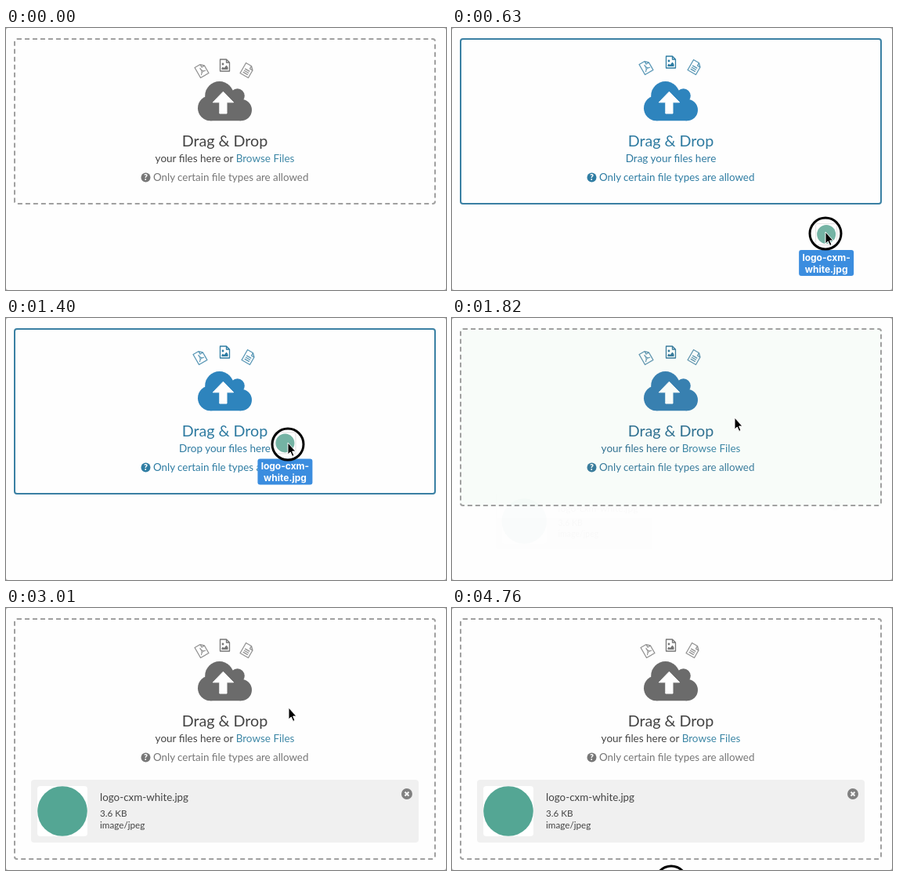
An HTML page for the animation above (4.83 s loop, 562x334 px).

```html
<!DOCTYPE html>
<html lang="en">
<head>
<meta charset="utf-8">
<title>Drag and drop upload</title>
<style>
  html, body { margin: 0; width: 100%; height: 100%; overflow: hidden; background: #b4b4b4; }
  #stage { position: relative; width: 562px; height: 334px; overflow: hidden; background: #fefefe; border-radius: 3px; }
  #panel { position: absolute; box-sizing: border-box; left: 10px; top: 13px; width: 539px;
    border: 2px dashed #a0a0a0; border-radius: 4px; background: var(--bg); }
  #panel.active { border: 2px solid #3a80a3; }
  svg { position: absolute; left: 0; top: 0; font-family: Lato, "Open Sans", sans-serif; font-size: 13.5px; }
  #icons { fill: none; stroke: var(--muted); stroke-width: 1.3; stroke-linejoin: round; }
  #icons .solid { fill: var(--muted); stroke: none; }
  #label { font: 700 12px Inter, Roboto, sans-serif; fill: #fff; text-anchor: middle; }
  .mid { text-anchor: middle; }
</style>
</head>
<body>
<div id="stage">
  <div id="panel"></div>
  <svg width="562" height="334" viewBox="0 0 562 334">
    <defs>
      <path id="sheet" d="M-6 -7.5H2L6 -3.5V7.5H-6ZM2 -7.5V-3.5H6"/>
    </defs>

    <g id="icons">
      <g id="pdf" opacity=".8">
        <use href="#sheet"/>
        <path d="M-3.5 5C-1 3 .5 -1 -.5 -3.5C-1.5 -2 1 2.5 4 2.5C1 1.5 -2 2.5 -3.5 5" stroke-width="1"/>
      </g>
      <g id="image">
        <use href="#sheet"/>
        <path class="solid" d="M-4 5.5V3.5L-2.5 2L-1 3.5L2 0L4 2.5V5.5Z"/>
        <circle class="solid" cx="-2.5" cy="-1.5" r="1.4"/>
      </g>
      <g id="doc" opacity=".8">
        <use href="#sheet"/>
        <path d="M-3.5 -.5H3.5M-3.5 2H3.5M-3.5 4.5H3.5"/>
      </g>
    </g>

    <g fill="var(--cloud)">
      <circle cx="272.6" cy="86.4" r="18.4"/>
      <circle cx="261.1" cy="102.2" r="16.1"/>
      <circle cx="295.6" cy="86.4" r="9.2"/>
      <circle cx="300.2" cy="104.5" r="13.8"/>
      <path d="M261 92H300V118.3H261Z"/>
    </g>
    <path d="M277.4 81.2L290.6 94.8H282V109H272.8V94.8H264.2Z" fill="var(--bg)" stroke="var(--bg)" stroke-linejoin="round"/>

    <text class="mid" x="279.5" y="151" font-size="19.7" fill="var(--title)">Drag &amp; Drop</text>
    <text class="mid" x="279.5" y="171" fill="var(--title)"><tspan id="hint"></tspan><tspan id="link" fill="#3d87a6">Browse Files</tspan></text>
    <circle cx="178.5" cy="190.5" r="6" fill="var(--muted)"/>
    <text class="mid" x="178.5" y="194.3" font-size="10.5" font-weight="900" fill="var(--bg)">?</text>
    <text x="188" y="195" font-size="13.35" fill="var(--muted)">Only certain file types are allowed</text>

    <g id="item">
      <rect x="32" y="219" width="495" height="80" rx="4" fill="#f0f0f0"/>
      <rect x="40" y="227" width="64" height="64" rx="4" fill="#fff"/>
      <circle cx="72" cy="259" r="31.8" fill="#54a694"/>
      <g fill="#444" font-size="11.7">
        <text x="120" y="246" font-size="13.4">logo-cxm-white.jpg</text>
        <text x="120" y="266">3.6 KB</text>
        <text x="120" y="281">image/jpeg</text>
      </g>
      <circle cx="512" cy="237" r="7" fill="#808080"/>
      <path d="M509.5 234.5L514.5 239.5M514.5 234.5L509.5 239.5" stroke="#f4f4f4" stroke-width="2"/>
    </g>

    <g id="file">
      <path d="M-13.5 -12.5H13.5V14.5H-13.5Z" fill="#fff" stroke="#ddd" opacity=".9"/>
      <circle cy="1" r="12" fill="#74b3a4"/>
      <g id="label">
        <rect x="-35" y="21" width="70" height="33" rx="3" fill="#3b8ddf"/>
        <text y="35">logo-cxm-</text>
        <text y="50">white.jpg</text>
      </g>
    </g>
    <circle id="ring" r="20" fill="none" stroke="#000" stroke-width="3"/>
    <path id="pointer" d="M0 -2V13L3.3 10L5.7 15.4L8 14.4L5.7 9H10Z" stroke="#fff" stroke-linejoin="round"/>
  </svg>
</div>
<script>
  const LOOP = 4830, STEP = 70;
  const DRAG_START = 70, OVER = 1190, DROP = 1820, LEAVE = 3290, LEFT = 3850, PRESS = 4760;
  const LAG = 5;

  // Turning points of the drag; the pointer curves smoothly through them.
  const turns = [
    { t: DRAG_START, x: 592, y: 258 },
    { t: 630, x: 477, y: 262 },
    { t: 980, x: 385, y: 244 },
    { t: 1170, x: 245, y: 42 },
    { t: 1400, x: 360, y: 161 },
    { t: 1540, x: 509, y: 230 },
    { t: 1750, x: 361, y: 129 }
  ];
  const rest = turns[turns.length - 1];

  const palette = {
    title: ['#444444', '#2f7ba1'],
    muted: ['#777777', '#2f7da3'],
    cloud: ['#6b6b6b', '#2e84bd']
  };

  const $ = id => document.getElementById(id);
  const lerp = (a, b, p) => a + (b - a) * p;
  const ramp = (t, from, to) => {
    const p = Math.min(1, Math.max(0, (t - from) / (to - from)));
    return p * p * (3 - 2 * p);
  };
  const mix = (a, b, p) => `color-mix(in srgb, ${b} ${p * 100}%, ${a})`;
  const place = (id, x, y, extra = '') =>
    $(id).setAttribute('transform', `translate(${x} ${y}) ${extra}`);
  const show = (id, on) => { $(id).style.display = on ? '' : 'none'; };
  const setVar = (name, value) => $('stage').style.setProperty('--' + name, value);

  // Hermite curve whose slope at each turn follows its two neighbours.
  function curve(t, axis) {
    const last = turns.length - 1;
    const i = Math.max(0, turns.findIndex(turn => turn.t > t) - 1);
    const a = turns[i], b = turns[i + 1], span = b.t - a.t, p = (t - a.t) / span;
    const slope = k => {
      if (k === last) return 0;
      const before = turns[Math.max(0, k - 1)], after = turns[k + 1];
      return (after[axis] - before[axis]) / (after.t - before.t) * span;
    };
    const q = 1 - p;
    return lerp(a[axis], b[axis], p * p * (3 - 2 * p)) + p * q * (q * slope(i) - p * slope(i + 1));
  }

  function pointerAt(t) {
    if (t < rest.t) return [curve(t, 'x'), curve(t, 'y')];
    if (t >= PRESS) return [280, 349];
    const p = ramp(t, LEAVE, LEFT);
    return [lerp(rest.x, 272, p), lerp(rest.y, 342, p)];
  }

  function draw(t) {
    const dragging = t >= DRAG_START && t < DROP;
    const active = ramp(t, 0, 300) - ramp(t, 1750, 2030);
    const lift = ramp(t, 0, 300) - ramp(t, 2030, 2450);
    const flash = ramp(t, 1750, 2030) - ramp(t, 2170, 2730);
    const added = ramp(t, 1790, 2110);

    for (const name in palette) setVar(name, mix(...palette[name], active));
    setVar('bg', mix('#fefefe', '#d5f1e1', flash));
    $('panel').className = dragging ? 'active' : '';
    $('panel').style.height = lerp(212, 308, ramp(t, 1750, 2030)) + 'px';

    $('hint').textContent = dragging
      ? (t < OVER ? 'Drag' : 'Drop') + ' your files here'
      : 'your files here or ';
    $('link').textContent = dragging ? '' : 'Browse Files';

    place('pdf', 250 - 2 * lift, 54 - 4 * lift, 'rotate(-30)');
    place('image', 279.5, 47.5 - 4 * lift);
    place('doc', 308 + 2 * lift, 54 - 4 * lift, 'rotate(30)');

    place('item', 279.5, 259, `scale(${lerp(0.9, 1, added)}) translate(-279.5 -259)`);
    $('item').setAttribute('opacity', added);

    const spot = pointerAt(t);
    place('ring', ...spot);
    place('pointer', ...spot);
    place('file', ...pointerAt(t - LAG));
    show('file', dragging);
    show('ring', dragging || t >= PRESS);
    show('pointer', t >= DRAG_START);
  }

  const start = performance.now();
  function tick() {
    const t = (performance.now() - start) % LOOP;
    draw(Math.floor(t / STEP) * STEP);
    requestAnimationFrame(tick);
  }
  tick();
</script>
</body>
</html>
```
